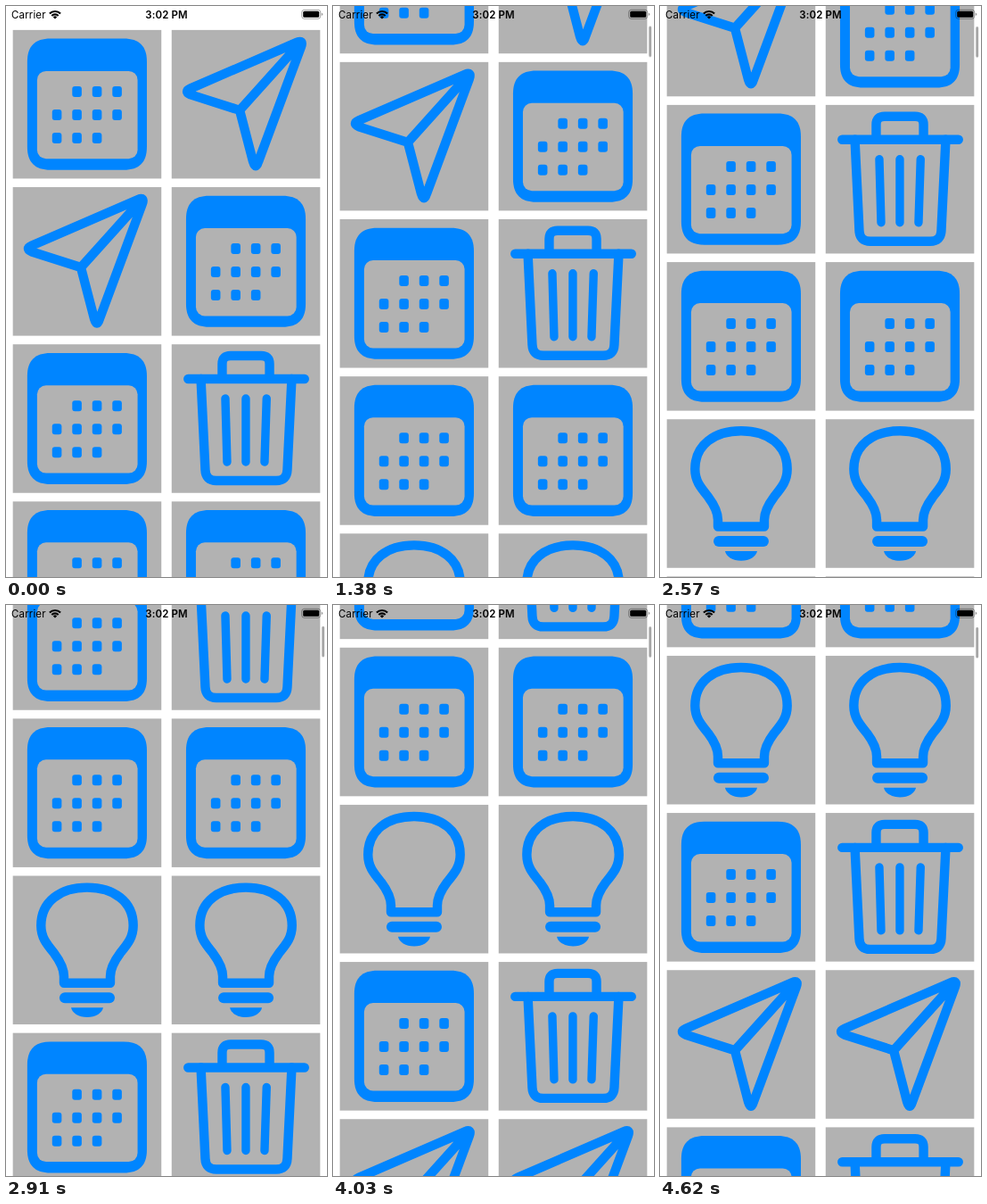
An HTML page that plays this animation: 360x640 px, repeating every 4.68 s.

```html
<!DOCTYPE html>
<html lang="en">
<head>
<meta charset="utf-8">
<title>Icon grid</title>
<style>
  @property --y { syntax: '<number>'; inherits: true; initial-value: 0; }

  html, body { margin: 0; width: 100%; height: 100%; overflow: hidden; background: #fff; }

  #stage {
    --blue: #0085ff;
    --tile: #b2b2b2;
    display: block;
    width: 360px;
    height: 640px;
    animation: scroll 4680ms step-end infinite;
  }
  #list { transform: translateY(calc(var(--y) * -1px)); }
  #thumb {
    fill: #000;
    fill-opacity: .35;
    transform: translateY(calc(var(--y) * .0045px));
    animation: reveal 4680ms step-end infinite;
  }

  .tile { fill: var(--tile); }
  .solid { fill: var(--blue); }
  .line { fill: none; stroke: var(--blue); stroke-width: 10.4; stroke-linecap: round; stroke-linejoin: round; }
  text { font: 11.5px Inter, "Liberation Sans", sans-serif; }
  .clock { font-weight: 600; text-anchor: middle; letter-spacing: .1px; }
  .arc { fill: none; stroke: #000; stroke-width: 2.1; }

  /* three swipes, each sampled in coarse steps */
  @keyframes scroll {
    0% { --y: 0; }
    19.658% { --y: .5; }
    22.222% { --y: 14; }
    24.572% { --y: 48; }
    26.923% { --y: 94; }
    29.487% { --y: 140.2; }
    31.837% { --y: 182; }
    34.401% { --y: 219; }
    36.965% { --y: 246; }
    39.529% { --y: 262; }
    54.914% { --y: 268.3; }
    57.478% { --y: 306; }
    59.829% { --y: 368; }
    62.179% { --y: 428; }
    64.743% { --y: 470; }
    67.094% { --y: 488.6; }
    86.111% { --y: 507.6; }
    88.461% { --y: 552; }
    91.025% { --y: 600; }
    93.589% { --y: 638; }
    96.153% { --y: 662; }
    98.717%, 100% { --y: 674.6; }
  }
  @keyframes reveal {
    0% { opacity: 0; }
    19.658%, 100% { opacity: 1; }
  }
</style>
</head>
<body>
<svg id="stage" viewBox="0 0 360 640">
  <defs>
    <rect id="dot" class="solid" x="-5.3" y="-6" width="10.6" height="12" rx="3"/>

    <g id="calendar">
      <path class="solid" d="M16.2 35.7C16.2 18.2 24.7 9.7 42.2 9.7H124.3C141.8 9.7 150.3 18.2 150.3 35.7V130.8C150.3 148.3 141.8 156.8 124.3 156.8H42.2C24.7 156.8 16.2 148.3 16.2 130.8Z"/>
      <rect class="tile" x="27.2" y="46" width="112.7" height="98.4" rx="10"/>
      <g id="dots"></g>
    </g>

    <g id="plane" class="line">
      <path d="M76.3 90L21.3 72.5Q13.3 69 21.3 65.5L140.3 14Q148.3 10.5 145.1 19L97.3 147.5Q94.3 157.5 91.3 147.5ZL142 17"/>
    </g>

    <g id="trash" class="line">
      <path d="M18.5 38.8H149M56.7 38.8V22Q56.7 12.8 66.2 12.8H100.3Q109.8 12.8 109.8 22V38.8"/>
      <path d="M32.8 38.8L37.7 140.8Q38.2 152.8 50.2 152.8H117.2Q129.2 152.8 129.7 140.8L134.7 38.8"/>
      <path stroke-width="9.4" style="stroke-width:9.4" d="M60.2 60.8L62.2 131.8M83.2 60.8V131.8M106.5 60.8L104.2 131.8"/>
    </g>

    <g id="bulb">
      <path class="line" d="M57.3 120.3V112.8C57.3 102.8 52.3 94.8 46.3 86.8C37.3 75.8 31.6 68.8 31.6 55.8C31.6 28.8 53.3 13.1 83.3 13.1C113.3 13.1 135 28.8 135 55.8C135 68.8 129.3 75.8 120.3 86.8C114.3 94.8 109.3 102.8 109.3 112.8V120.3Z"/>
      <path class="line" style="stroke-width:12" d="M58.3 136.8H108.3"/>
      <path class="solid" d="M65.3 147.8H101.3C100 154 93 158.5 83.3 158.5C73.6 158.5 66.6 154 65.3 147.8Z"/>
    </g>
  </defs>

  <rect width="360" height="640" fill="#fff"/>
  <g id="list"></g>
  <rect id="thumb" x="354.24" y="22" width="2.88" height="34.5" rx="1.44"/>

  <g id="status">
    <text x="6" y="14" letter-spacing=".15">Carrier</text>
    <path class="arc" d="M48.9 8.6A8.5 8.5 0 0 1 61.1 8.6M51.3 10.9A5.2 5.2 0 0 1 58.7 10.9"/>
    <path d="M55 14.6L52.8 12.4A3.1 3.1 0 0 1 57.2 12.4Z"/>
    <text class="clock" x="180" y="14">3:02 PM</text>
    <rect x="331.7" y="4.3" width="21" height="10" rx="2.8" fill="none" stroke="#000" stroke-opacity=".35"/>
    <rect x="333.2" y="5.8" width="18" height="7" rx="1.5"/>
    <path d="M353.8 7.6Q355.2 8 355.2 9.3T353.8 11Z" fill-opacity=".4"/>
  </g>
</svg>
<script>
  const byId = id => document.getElementById(id);
  const use = (id, x, y) => `<use href="#${id}" x="${x}" y="${y}"/>`;

  // first and last filled column in each calendar week
  const weeks = [[1, 3], [0, 3], [0, 2]];
  byId('dots').innerHTML = weeks.map(([from, to], row) => {
    let out = '';
    for (let col = from; col <= to; col++) out += use('dot', 49.4 + col * 22.5, 69 + row * 26);
    return out;
  }).join('');

  const icons = { c: 'calendar', p: 'plane', t: 'trash', b: 'bulb' };
  const rows = ['cp', 'pc', 'ct', 'cc', 'bb', 'ct', 'pp', 'ct'];
  const size = 166.56;
  byId('list').innerHTML = rows.map((row, r) => [...row].map((key, c) => {
    const x = 7.68 + c * 178.08, y = 26.88 + r * 176.16;
    return `<rect class="tile" x="${x}" y="${y}" width="${size}" height="${size}"/>` + use(icons[key], x, y);
  }).join('')).join('');
</script>
</body>
</html>
```
